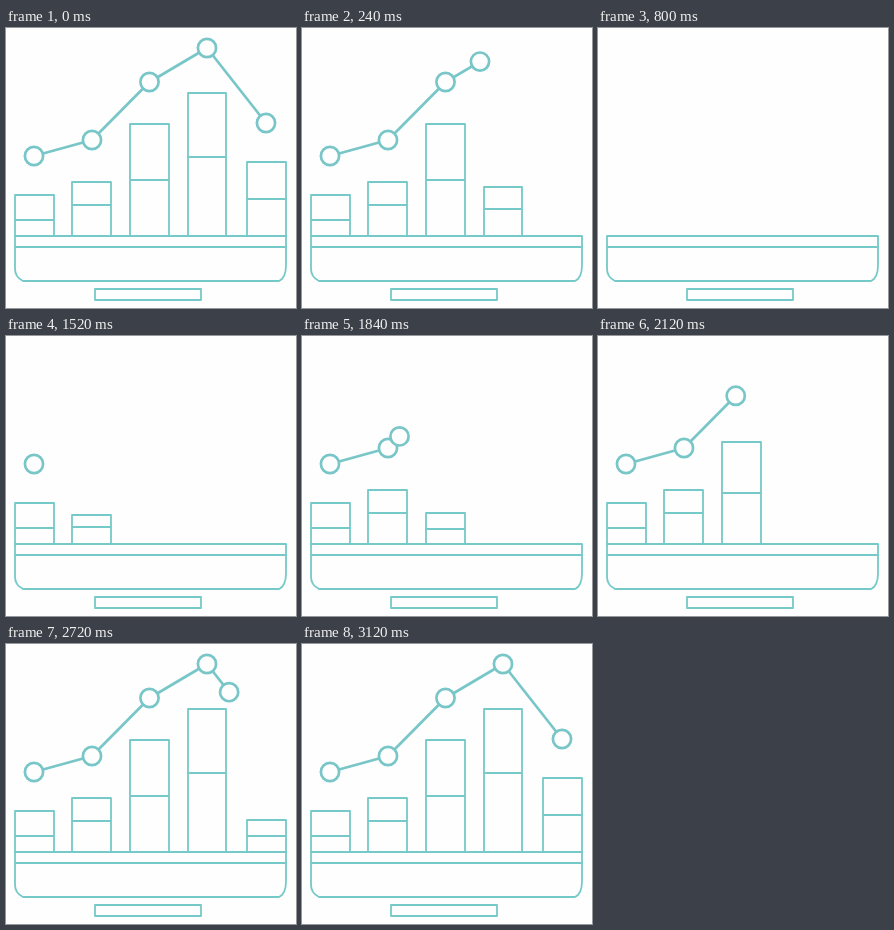
An HTML page with a canvas for the animation above (3.16 s loop, 290 px wide and 280 px high).

```html
<!DOCTYPE html>
<html lang="en">
<head>
<meta charset="utf-8">
<title>Chart on a monitor</title>
<style>
html, body { margin: 0; width: 100%; height: 100%; overflow: hidden; background: #fefefe; }
canvas { display: block; }
</style>
</head>
<body>
<canvas id="stage" width="290" height="280"></canvas>
<script>
const ctx = document.getElementById('stage').getContext('2d');
const LOOP = 3160, TICK = 40, FLOOR = 208, PAPER = '#fefefe';
const HIDDEN = 800, SHOWN = 1280;

// fall and rise are [start, end] times in ms
const bars = [
  { x: 9, w: 39, top: 167, split: 192, fall: [640, 800], rise: [1240, 1500] },
  { x: 66, w: 39, top: 154, split: 177, fall: [528, 700], rise: [1280, 1720] },
  { x: 124, w: 39, top: 96, split: 152, fall: [308, 528], rise: [1720, 2160] },
  { x: 182, w: 38, top: 65, split: 129, fall: [110, 308], rise: [2160, 2600] },
  { x: 241, w: 39, top: 134, split: 171, fall: [0, 140], rise: [2600, 2880] }
];
const dots = [
  { x: 28, y: 128 },
  { x: 86, y: 112, fall: [560, 760], rise: [1520, 1750] },
  { x: 143.5, y: 54, fall: [360, 560], rise: [1760, 2160] },
  { x: 201, y: 20, fall: [160, 360], rise: [2344, 2624] },
  { x: 260, y: 95, fall: [0, 160], rise: [2624, 2880] }
];

const ramp = (t, [a, b]) => Math.min(1, Math.max(0, (t - a) / (b - a)));
const amount = (part, t) => t < SHOWN ? 1 - ramp(t, part.fall) : ramp(t, part.rise);
const mix = (a, b, k) => a + (b - a) * k;

function line(x1, y1, x2, y2) {
  ctx.beginPath();
  ctx.moveTo(x1, y1);
  ctx.lineTo(x2, y2);
  ctx.stroke();
}

function drawBase() {
  ctx.beginPath();
  ctx.moveTo(9, FLOOR);
  ctx.lineTo(280, FLOOR);
  ctx.lineTo(280, 237);
  ctx.quadraticCurveTo(280, 250, 273, 253);
  ctx.lineTo(17, 253);
  ctx.quadraticCurveTo(9, 249, 9, 241);
  ctx.closePath();
  ctx.stroke();
  line(9, 219, 280, 219);
  ctx.strokeRect(89, 261, 106, 11);
}

function drawBar(bar, k) {
  if (k <= 0) return;
  const top = Math.round(mix(FLOOR, bar.top, k));
  const split = Math.round(mix(FLOOR, bar.split, k));
  ctx.strokeRect(bar.x, top, bar.w, FLOOR - top);
  line(bar.x, split, bar.x + bar.w, split);
}

function drawDots(t) {
  if (t >= HIDDEN && t < SHOWN) return;
  const path = [dots[0]];
  for (let i = 1; i < dots.length; i++) {
    const k = amount(dots[i], t);
    if (k <= 0) break;
    const from = dots[i - 1], to = dots[i];
    path.push({ x: mix(from.x, to.x, k), y: mix(from.y, to.y, k) });
  }
  path.slice(1).forEach((p, i) => line(path[i].x, path[i].y, p.x, p.y));
  for (const p of path) {
    ctx.beginPath();
    ctx.arc(p.x, p.y, 9.1, 0, Math.PI * 2);
    ctx.fill();
    ctx.stroke();
  }
}

function draw(t) {
  ctx.fillStyle = PAPER;
  ctx.fillRect(0, 0, 290, 280);
  ctx.lineJoin = 'round';
  ctx.strokeStyle = '#75c9c8';
  ctx.lineWidth = 1.8;
  drawBase();
  bars.forEach(bar => drawBar(bar, amount(bar, t)));
  ctx.strokeStyle = '#79c6c8';
  ctx.lineWidth = 2.7;
  drawDots(t);
}

const start = performance.now();
function frame() {
  const t = (performance.now() - start) % LOOP;
  draw(Math.floor(t / TICK) * TICK);
  requestAnimationFrame(frame);
}
frame();
</script>
</body>
</html>
```
